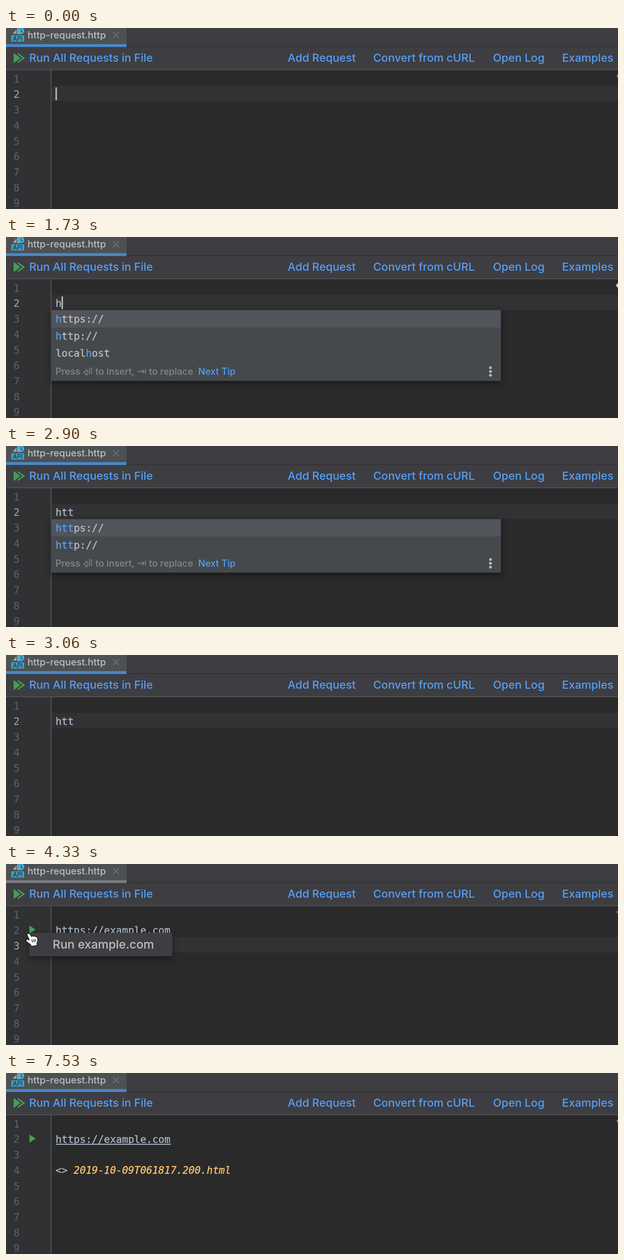
An HTML page that plays this animation: 1280x381 px, repeating every 9330 ms.

```html
<!DOCTYPE html>
<html lang="en">
<head>
<meta charset="utf-8">
<title>HTTP request editor</title>
<style>
  html, body { margin: 0; width: 100%; height: 100%; overflow: hidden; background: #2b2b2b; }
  svg { display: block; width: 100vw; height: 100vh; }
  text { white-space: pre; }
  .ui { font-family: Inter, "Open Sans", sans-serif; font-weight: 500; }
  .mono { font: 21px "DejaVu Sans Mono", "Liberation Mono", monospace; }
  .code { fill: currentColor; stroke: currentColor; stroke-width: .4; }
  .link { font-size: 23.3px; fill: #549ff5; }
  .tip { font-size: 19.4px; fill: #85878a; }
  .float { filter: drop-shadow(0 5px 7px rgba(0, 0, 0, .45)); }
</style>
</head>
<body>
<svg id="stage" viewBox="0 0 1280 381" preserveAspectRatio="none">
  <rect width="1280" height="381" fill="#2a2a2b"/>
  <rect id="lineBand" x="96" y="122" width="1184" height="32" fill="#323234"/>
  <rect y="88" width="94" height="293" fill="#303133"/>
  <rect x="93.5" y="88" width="1.8" height="293" fill="#57585a"/>
  <rect width="1280" height="87" fill="#3e3d42"/>
  <rect y="38.5" width="1280" height="1.5" fill="#313135"/>
  <rect y="87" width="1280" height="1.7" fill="#545557"/>

  <rect width="252" height="35" fill="#4d5154"/>
  <rect id="tabLine" y="34" width="252" height="6"/>
  <g id="fileIcon">
    <path d="M14 12 L22 3 V12 Z M23.5 0 H26 Q23 7 29 13 H23.5 Z" fill="#9ba3a8"/>
    <circle cx="31.5" cy="6" r="6.7" fill="#3fb3e2"/>
    <path d="M31.5 1.5 V6.5 L34.5 9" fill="none" stroke="#33444e" stroke-width="1.7"/>
    <rect x="11" y="15.5" width="27" height="13" fill="#3f9fc4"/>
    <text class="ui" x="24.5" y="26.6" text-anchor="middle" font-size="12.5" fill="#1f323c">API</text>
  </g>
  <text class="ui" x="45" y="22" font-size="20" fill="#bdbfc1">http-request.http</text>
  <path d="M224 9 L236.5 21.5 M236.5 9 L224 21.5" stroke="#75787b" stroke-width="1.6"/>

  <g fill="#499c54">
    <path d="M16 52.5 L30 63.3 L16 74 Z"/>
    <path d="M24.5 52.5 L39.8 63.3 L24.5 74 V70.5 L34.5 63.3 L24.5 56 Z"/>
  </g>
  <g class="ui link">
    <text x="48.5" y="71">Run All Requests in File</text>
    <text x="589" y="71">Add Request</text>
    <text x="768" y="71">Convert from cURL</text>
    <text x="1018.5" y="71">Open Log</text>
    <text x="1163" y="71">Examples</text>
  </g>

  <g id="numbers" class="mono"></g>
  <path id="runIcon" d="M49 129.5 L62 138 L49 146.5 Z" fill="#499c54"/>
  <text id="code" class="mono code" x="103.7" y="147" color="#a9b7c6"></text>
  <rect id="underline" x="104" y="149" width="241" height="2" fill="#a9b7c6"/>
  <rect id="caret" y="125" width="3" height="27" fill="#bbbbbb"/>
  <g id="response" class="mono code">
    <text x="103.7" y="212.3" color="#a9b7c6">&lt;&gt;</text>
    <text x="141.6" y="212.3" color="#ffc66d" font-style="italic">2019-10-09T061817.200.html</text>
  </g>
  <path id="mark"/>

  <g id="popup" class="float">
    <rect id="popupBox" x="94.5" y="154" width="940.5" fill="#46494b"/>
    <rect x="95" y="154" width="940" height="36.5" fill="#51545b"/>
    <g id="rows" class="mono code" color="#bcbdbe"></g>
    <g id="footer" class="ui tip">
      <text x="103.5" y="7">Press</text>
      <path d="M175 -7 H179 V4 H169 V8 L162.5 2 L169 -4 V0 H175 Z" fill="none" stroke="#85878a" stroke-width="1.5"/>
      <text x="187" y="7">to insert,</text>
      <path d="M275 0 H289 M284.5 -4 L289 0 L284.5 4 M291.8 -5 V5" fill="none" stroke="#85878a" stroke-width="1.7"/>
      <text x="299" y="7">to replace</text>
      <text x="402" y="7" fill="#549ff5">Next Tip</text>
      <g fill="#b8babc">
        <circle cx="1013.3" cy="-8" r="2.9"/><circle cx="1013.3" r="2.9"/><circle cx="1013.3" cy="8" r="2.9"/>
      </g>
    </g>
  </g>

  <g id="menu">
    <rect class="float" x="48.5" y="145" width="299.5" height="49" fill="#3e3d42"/>
    <rect id="menuHover" x="48.5" y="152" width="299.5" height="35.5" fill="#2664cf"/>
    <text id="menuText" class="ui" x="97.5" y="178" font-size="24.9">Run example.com</text>
  </g>
  <g id="hand" stroke="#1c1c1c" stroke-width="1.3" stroke-linejoin="round">
    <path d="M44 149 Q45 144.5 49.5 147 L53.5 153 Q55 150 58 152.500 Q60.500 150.500 62.500 153.500 Q65.500 152.500 66 157 Q67 163 64.500 167 L65 171.500 L53 173.500 L51.500 169.500 L43 163.500 Q41 159.500 44.500 158.500 L49 160 Z" fill="#f4f4f4"/>
    <path d="M54 159 L55.5 165 M57.5 158.5 L59 164.5 M61 158 L62 164" fill="none"/>
  </g>
  <path id="arrow" d="M121 181 V206 L126.7 200.8 L131 210.5 L135.3 208.6 L131 199.3 L138.3 198.7 Z" fill="#252525" stroke="#eeeeee" stroke-width="2" stroke-linejoin="round"/>
</svg>
<script>
const LOOP = 9330, CHAR = 12.643, ROW = 32.7;
const URL_TEXT = "https://example.com";
const HINTS = ["https://", "http://", "localhost"];
const $ = id => document.getElementById(id);

// Each track holds [start time, value] pairs.
const tracks = {
  code: [[0, ""], [1700, "h"], [1960, "ht"], [2200, "htt"], [3100, "https://"], [3300, URL_TEXT]],
  prefix: [[0, ""], [1730, "h"], [2030, "ht"], [2230, "htt"], [3060, ""]],
  caret: [[0, true], [360, false], [860, true], [1360, false], [1700, true], [2900, false], [3100, true], [4230, false]],
  line: [[0, 2], [4230, 3], [7530, 0]],
  mark: [[0, "green"], [1700, "white"], [1990, ""], [3100, "white"], [3360, "green"]],
  run: [[0, false], [3330, true]],
  menu: [[0, ""], [4330, "idle"], [5860, "hover"], [7530, ""]],
  cursor: [[0, ""], [4230, "hand"], [5860, "arrow"], [7530, ""]],
  done: [[0, false], [7530, true]]
};
const marks = {
  green: ["M1276.5 101 L1280 97.5 V105 Z", "#499c54"],
  white: ["M1275.5 102 L1280 96.5 V107.5 Z", "#d5d5d5"],
  "": ["", "none"]
};

const at = (track, t) => track.reduce((value, [start, next]) => t >= start ? next : value, track[0][1]);
const show = (id, on) => $(id).setAttribute("display", on ? "inline" : "none");
const set = (id, attrs) => {
  for (const key in attrs) $(id).setAttribute(key, attrs[key]);
};

$("numbers").innerHTML = Array.from({ length: 9 }, (_, i) =>
  `<text x="15.7" y="${114.7 + i * ROW}">${i + 1}</text>`).join("");

function hintRow(hint, prefix, i) {
  const start = hint.indexOf(prefix), end = start + prefix.length;
  return `<text x="103.7" y="${179.7 + i * 36.2}">${hint.slice(0, start)}` +
    `<tspan color="#549ff5">${prefix}</tspan>${hint.slice(end)}</text>`;
}

let shownPrefix = null;
function drawPopup(prefix) {
  show("popup", prefix);
  if (!prefix || prefix === shownPrefix) return;
  shownPrefix = prefix;
  const hits = HINTS.filter(hint => hint.includes(prefix));
  $("rows").innerHTML = hits.map((hint, i) => hintRow(hint, prefix, i)).join("");
  set("popupBox", { height: 40 + hits.length * 36.3 });
  set("footer", { transform: `translate(0 ${174.2 + hits.length * 36.3})` });
}

function draw(t) {
  const s = {};
  for (const name in tracks) s[name] = at(tracks[name], t);

  $("code").textContent = s.code;
  set("caret", { x: 103.5 + s.code.length * CHAR });
  show("caret", s.caret);
  show("underline", s.code === URL_TEXT);
  show("runIcon", s.run);
  show("response", s.done);
  [...$("numbers").children].forEach((number, i) =>
    number.setAttribute("fill", i + 1 === s.line ? "#a9a9aa" : "#606366"));
  show("lineBand", s.line);
  set("lineBand", { y: 122 + (s.line - 2) * ROW });
  const [d, fill] = marks[s.mark];
  set("mark", { d, fill });

  drawPopup(s.prefix);
  show("menu", s.menu);
  show("menuHover", s.menu === "hover");
  set("menuText", { fill: s.menu === "hover" ? "#ffffff" : "#bfbfc1" });
  set("tabLine", { fill: s.menu ? "#777b7f" : "#4788c7" });
  show("hand", s.cursor === "hand");
  show("arrow", s.cursor === "arrow");
}

const begin = performance.now();
function tick() {
  draw((performance.now() - begin) % LOOP);
  requestAnimationFrame(tick);
}
tick();
</script>
</body>
</html>
```
